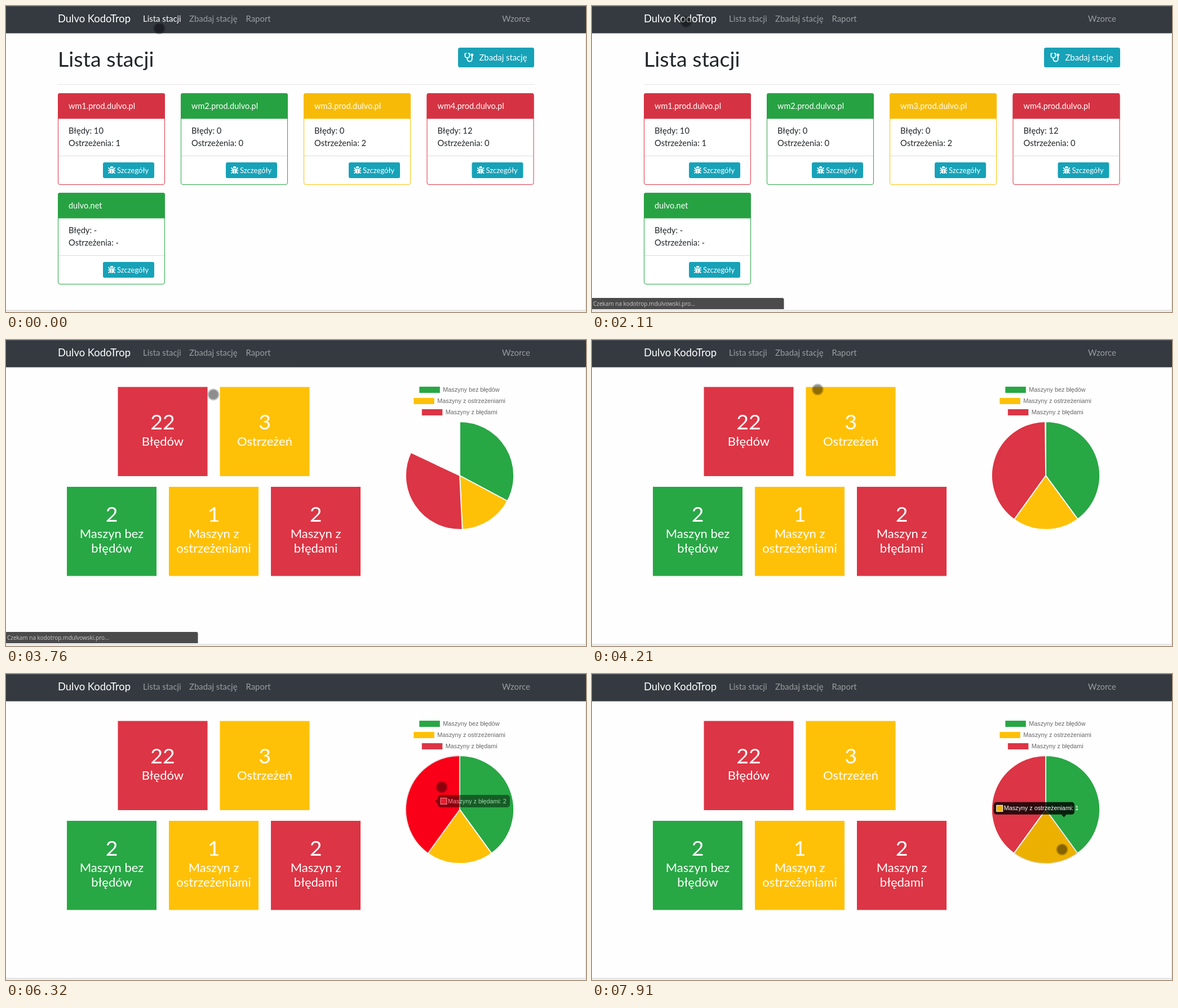
An HTML page that plays this animation: 1029 by 544 pixels, repeating every 8 s.

```html
<!DOCTYPE html>
<html lang="pl">
<head>
<meta charset="utf-8">
<title>Stacje</title>
<style>
  html, body { margin: 0; width: 100%; height: 100%; overflow: hidden; background: #fefefe; }
  svg { display: block; width: 100vw; height: 100vh; }
  text { font-family: Lato, "Open Sans", sans-serif; white-space: pre; }
  .chart { font-family: "Liberation Sans", Arial, sans-serif; }
  .status { font-family: "Open Sans", "Noto Sans", sans-serif; }
</style>
</head>
<body>
<svg id="stage" viewBox="0 0 1029 544"></svg>
<script>
const LOOP = 8000, LAST_CHANGE = 7910;
const GREEN = '#28a745', YELLOW = '#ffc107', RED = '#dc3545', TEAL = '#17a2b8', INK = '#212529';
const HEADER = { [GREEN]: '#27a243', [YELLOW]: '#f7bb07', [RED]: '#d53343' };

const rect = (x, y, w, h, fill, more = '') =>
  `<rect x="${x}" y="${y}" width="${w}" height="${h}" fill="${fill}" ${more}/>`;
const text = (x, y, str, size, fill, more = '') =>
  `<text x="${x}" y="${y}" font-size="${size}" fill="${fill}" ${more}>${str}</text>`;
const centered = (x, y, str, size) => text(x, y, str, size, '#fff', 'text-anchor="middle"');

const bug = (x, y) => `<g transform="translate(${x} ${y})" fill="#fff">
  <path d="M3.6 3.2a3 3.2 0 0 1 6 0zM3 4.4h7.2v5a3.6 3.6 0 0 1-7.2 0z"/>
  <path d="M3.4 5.4L1.2 3.2V2M9.8 5.4L12 3.2V2M3 7.6H0M10.2 7.6h3M3.4 10l-2.2 1.8V13M9.8 10l2.2 1.8V13"
    fill="none" stroke="#fff" stroke-width="1.5"/>
  <path d="M6.6 6v7" stroke="${TEAL}" stroke-width=".9"/></g>`;

const stethoscope = `<g fill="none" stroke="#fff" stroke-width="1.9" stroke-linecap="round">
  <path d="M816.4 84.2l-2 .5v3.6a4 4 0 0 0 8 0v-3.6l-2-.5M818.4 92.5v1.8a4.2 4.2 0 0 0 8.4 0v-5.3"/>
  <circle cx="826.8" cy="87" r="1.5"/></g>`;

function card(x, y, color, host, errors, warnings) {
  return rect(x + .5, y + .5, 189, 162, '#fff', `rx="3.5" stroke="${color}"`)
    + `<path d="M${x} ${y + 45.5}v-42a3.5 3.5 0 0 1 3.5-3.5h183a3.5 3.5 0 0 1 3.5 3.5v42z" fill="${HEADER[color]}"/>`
    + text(x + 19, y + 27.5, host, 14.5, '#fff')
    + text(x + 19, y + 72, 'Błędy: ' + errors, 14.7, INK)
    + text(x + 19, y + 94, 'Ostrzeżenia: ' + warnings, 14.7, INK)
    + rect(x + 1, y + 111, 188, 1, '#dcdcdc')
    + rect(x + 80, y + 123, 91, 28, TEAL, 'rx="3"')
    + bug(x + 89, y + 130)
    + text(x + 105, y + 141.5, 'Szczegóły', 13, '#fff');
}

function tile(x, y, color, count, labels, numberY) {
  const mid = x + 79.5;
  return rect(x, y, 159, 158.5, color) + centered(mid, y + numberY, count, 37.5)
    + labels.map((s, i) => centered(mid, y + numberY + 29.5 + i * 26, s, 22)).join('');
}

const legend = (x, y, color, label) => rect(x, y, 36.5, 11, color)
  + text(x + 42, y + 9, label, 10.8, '#666', 'class="chart"');

const stage = document.getElementById('stage');
stage.innerHTML = `
  ${rect(0, 0, 1029, 544, '#fefefe')}
  ${rect(0, 0, 1029, 48.5, '#343a40')}${rect(0, 0, 1029, 1, '#50555a')}
  ${text(92, 29, 'Dulvo KodoTrop', 18.4, '#fff')}
  ${text(243, 28, 'Lista stacji', 14.9, '#fff', 'id="active"')}
  ${text(325, 28, 'Zbadaj stację', 14.9, '#9a9da0')}
  ${text(425.5, 28, 'Raport', 14.9, '#9a9da0')}
  ${text(880, 28, 'Wzorce', 14.9, '#9a9da0')}
  <g id="list">
    ${text(92, 108, 'Lista stacji', 37.5, INK)}
    ${rect(802, 74, 135, 35, TEAL, 'rx="3.6"')}${stethoscope}
    ${text(839.5, 96.5, 'Zbadaj stację', 14.8, '#fff')}
    ${rect(92, 139, 845, 1, '#e6e6e6')}
    ${card(92, 155, RED, 'wm1.prod.dulvo.pl', 10, 1)}
    ${card(310, 155, GREEN, 'wm2.prod.dulvo.pl', 0, 0)}
    ${card(528, 155, YELLOW, 'wm3.prod.dulvo.pl', 0, 2)}
    ${card(746.5, 155, RED, 'wm4.prod.dulvo.pl', 12, 0)}
    ${card(92, 332, GREEN, 'dulvo.net', '-', '-')}
  </g>
  <g id="report">
    ${tile(198.5, 83.5, RED, 22, ['Błędów'], 75)}
    ${tile(379.5, 83.5, YELLOW, 3, ['Ostrzeżeń'], 75)}
    ${tile(108, 261, GREEN, 2, ['Maszyn bez', 'błędów'], 61.5)}
    ${tile(289, 261, YELLOW, 1, ['Maszyn z', 'ostrzeżeniami'], 61.5)}
    ${tile(470, 261, RED, 2, ['Maszyn z', 'błędami'], 61.5)}
    ${legend(733.3, 83, GREEN, 'Maszyny bez błędów')}
    ${legend(723.3, 103, YELLOW, 'Maszyny z ostrzeżeniami')}
    ${legend(737.8, 123, RED, 'Maszyny z błędami')}
    <g id="pie"></g><g id="tip"></g>
  </g>
  ${rect(0, 541, 1029, 3, '#f0f0f0')}${rect(0, 540.5, 1029, 1, '#d4d4d4')}
  ${rect(1028, 48, 1, 493, '#dedede')}
  <g id="status">
    <path d="M0 519h337.500a3 3 0 0 1 3 3v17H0z" fill="#4b4b4b"/>
    ${text(2, 533, 'Czekam na kodotrop.mdulvowski.pro...', 10, '#cacaca', 'class="status"')}
  </g>
  <g id="cursor"><circle r="9.500" fill="none" stroke="#000" stroke-opacity=".24" stroke-width="2"/>
    <circle r="8.500" fill="#000" fill-opacity=".44"/></g>`;

const part = id => document.getElementById(id);
const show = (id, on) => { part(id).style.display = on ? '' : 'none'; };
const lerp = (a, b, p) => a + (b - a) * p;
const easeOut = t => 1 - (1 - Math.min(1, Math.max(0, t))) ** 4;

// Pointer path: time, x, y
const PATH = [
  [0, 272, 40], [150, 266, 39], [1010, 167, 31], [1290, 167, 30], [1410, 167, 28],
  [2900, 167, 28], [3500, 368, 97], [3850, 368, 97], [4050, 376, 95], [4210, 400, 88],
  [4380, 465, 84], [4700, 580, 105], [4990, 667, 154], [5140, 676, 181], [5290, 677, 188],
  [5740, 677, 188], [6160, 738, 205], [6320, 773, 201], [6600, 790, 205], [6950, 790, 205],
  [7350, 825, 235], [7760, 833, 272], [7910, 834, 312]
];
function pointer(t) {
  const i = PATH.findIndex(k => k[0] > t);
  if (i < 0) return PATH.at(-1).slice(1);
  const [a, b] = [PATH[i - 1], PATH[i]], p = (t - a[0]) / (b[0] - a[0]);
  return [lerp(a[1], b[1], p), lerp(a[2], b[2], p)];
}

const SLICES = [
  { color: GREEN, hover: '#08b330', share: .4 },
  { color: YELLOW, hover: '#ecb100', share: .2 },
  { color: RED, hover: '#f90018', share: .4 }
];
const TIPS = [
  { at: 6247, slice: 2, side: 'left', x: 766, y: 215, w: 128, caret: 758, label: 'Maszyny z błędami: 2' },
  { at: 7270, slice: 0, side: 'right', x: 707, y: 215, w: 137, caret: 851, label: 'Maszyny bez błędów: 2' },
  { at: 7876, slice: 1, side: 'bottom', x: 726, y: 258, w: 158, caret: 805, label: 'Maszyny z ostrzeżeniami: 1' }
];

function pie(progress, hovered) {
  const rim = a => `${805 + 96 * Math.sin(a)} ${241 - 96 * Math.cos(a)}`;
  let a = 0;
  return SLICES.map((s, i) => {
    const from = a, on = i === hovered;
    a += s.share * progress * 2 * Math.PI;
    return `<path d="M805 241L${rim(from)}A96 96 0 0 1 ${rim(a)}z" fill="${on ? s.hover : s.color}"
      stroke="${on ? '#e6e6e6' : '#fff'}" stroke-width="1.8" stroke-linejoin="bevel"/>`;
  }).join('');
}

function tooltip(t, i) {
  if (i < 0) return '';
  const tip = TIPS[i], prev = TIPS[i - 1] || tip, p = easeOut((t - tip.at) / 400);
  const [x, y, w, caret] = ['x', 'y', 'w', 'caret'].map(k => lerp(prev[k], tip[k], p));
  const slice = SLICES[tip.slice];
  const arrow = {
    left: `M${x} ${y + 6.5}l-5 4.500l5 4.500z`,
    right: `M${x + w} ${y + 6.5}l5 4.500l-5 4.500z`,
    bottom: `M${caret - 4.5} ${y + 22}l4.500 5l4.500-5z`
  }[tip.side];
  return `<g opacity="${i ? 1 : p}"><g opacity=".8">${rect(x, y, w, 22, '#000', 'rx="5"')}<path d="${arrow}"/></g>
    ${rect(x + 5, y + 5.5, 11, 11, i ? slice.hover : slice.color, 'stroke="#fff"')}
    ${text(x + 18, y + 14.5, tip.label, 10.8, '#fff', 'class="chart"')}</g>`;
}

function draw(now) {
  const t = Math.min(now % LOOP, LAST_CHANGE), report = t >= 3760;
  show('list', !report);
  show('report', report);
  show('status', t >= 720 && t < 1980 || t >= 2110 && t < 4050);
  part('active').setAttribute('fill', t < 1680 ? '#fff' : '#9a9da0');
  part('cursor').setAttribute('transform', `translate(${pointer(t)})`);
  if (report) {
    const i = TIPS.findLastIndex(tip => t >= tip.at);
    part('pie').innerHTML = pie(easeOut((t - 3412) / 1000), TIPS[i]?.slice);
    part('tip').innerHTML = tooltip(t, i);
  }
}

const start = performance.now();
function tick() {
  draw(performance.now() - start);
  requestAnimationFrame(tick);
}
tick();
</script>
</body>
</html>
```
